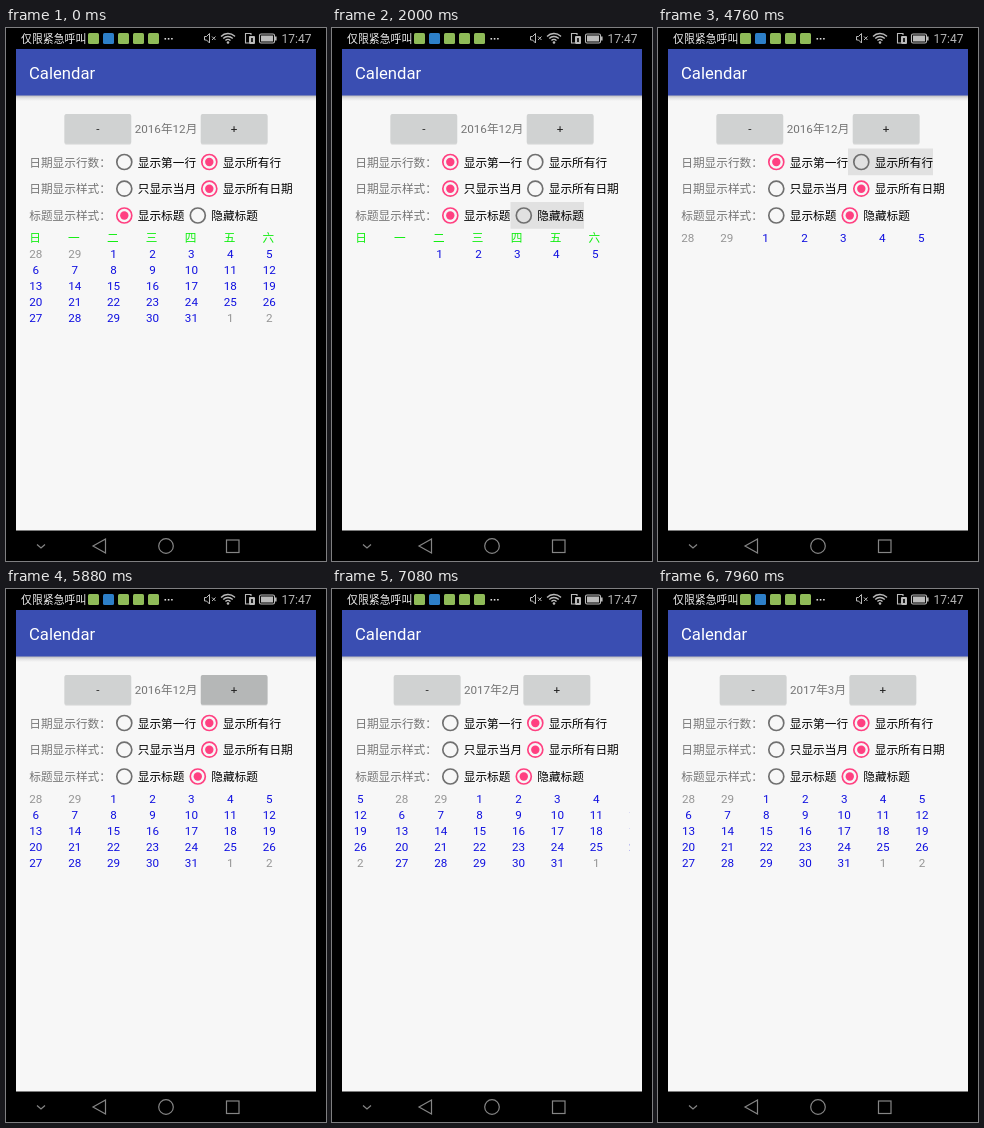
Recreate the animation shown at these times as an HTML page with a canvas. Size 320 px wide and 533 px high, loop 8000 ms.

```html
<!DOCTYPE html>
<html lang="zh-CN">
<head>
<meta charset="utf-8">
<title>Calendar</title>
<style>
html, body { margin: 0; width: 100%; height: 100%; overflow: hidden; background: #000; }
canvas { display: block; width: 320px; height: 533px; }
</style>
</head>
<body>
<canvas id="stage"></canvas>
<script>
const W = 320, H = 533, LOOP = 8000;
const PINK = '#ff4081', GREY = '#757575', BLUE = '#1010e0';
const FONT = 'Roboto, "Noto Sans CJK SC", "Noto Sans CJK", sans-serif';
const canvas = document.getElementById('stage');
const ctx = canvas.getContext('2d');
const scale = window.devicePixelRatio || 1;
canvas.width = W * scale;
canvas.height = H * scale;

// Radio rows: label, centre y, options as [text, left edge, right edge]
const ROWS = [
  { label: '日期显示行数：', y: 134, options: [['显示第一行', 105, 190], ['显示所有行', 190, 275]] },
  { label: '日期显示样式：', y: 160.7, options: [['只显示当月', 105, 190], ['显示所有日期', 190, 287]] },
  { label: '标题显示样式：', y: 187.5, options: [['显示标题', 105, 178.5], ['隐藏标题', 178.5, 252]] }
];

const START = {
  month: '2016年12月', radio: [1, 1, 0], held: null, plusDown: false,
  oneRow: false, monthOnly: false, header: true
};

// Each entry changes part of the state at a time in ms
const EVENTS = [
  [320, { held: [0, 0] }],
  [440, { radio: [0, 1, 0] }],
  [720, { oneRow: true, held: null }],
  [920, { held: [1, 0] }],
  [1200, { radio: [0, 0, 0] }],
  [1400, { monthOnly: true, held: null }],
  [2000, { held: [2, 1] }],
  [2840, { radio: [0, 0, 1] }],
  [3120, { header: false, held: null }],
  [3480, { held: [1, 1] }],
  [4200, { radio: [0, 1, 1], monthOnly: false, held: null }],
  [4760, { held: [0, 1] }],
  [5000, { radio: [1, 1, 1] }],
  [5400, { oneRow: false, held: null }],
  [5880, { plusDown: true }],
  [6520, { plusDown: false, month: '2017年1月' }],
  [7000, { plusDown: true }],
  [7080, { plusDown: false, month: '2017年2月' }],
  [7560, { plusDown: true }],
  [7640, { plusDown: false, month: '2017年3月' }]
];

// Page slides: start, time the held page moves on, offset at that time, decay per tick
const SLIDES = [[6520, 6720, 19, 0.46], [7080, 7320, 28, 0.5], [7640, 7840, 28, 0.3]];
const TICK = 40, PAGE = 275;

function stateAt(t) {
  const state = { ...START };
  for (const [time, change] of EVENTS) if (t >= time) Object.assign(state, change);
  return state;
}

function slideAt(t) {
  const slide = SLIDES.filter(s => t >= s[0]).pop();
  if (!slide) return 0;
  const [, move, first, decay] = slide;
  if (t < move) return 40;
  const offset = first * decay ** Math.floor((t - move) / TICK);
  return offset < 0.6 ? 0 : offset;
}

function box(x, y, w, h, color, r = 0) {
  ctx.fillStyle = color;
  ctx.beginPath();
  ctx.roundRect(x, y, w, h, r);
  ctx.fill();
}

function text(str, x, y, color, { size = 11.67, align = 'left', weight = 400 } = {}) {
  ctx.font = `${weight} ${size}px ${FONT}`;
  ctx.textAlign = align;
  ctx.fillStyle = color;
  ctx.fillText(str, x, y + size * 0.36);
}

function circle(x, y, r) {
  ctx.beginPath();
  ctx.arc(x, y, r, 0, Math.PI * 2);
}

function line(points, closed) {
  ctx.beginPath();
  points.forEach(([x, y]) => ctx.lineTo(x, y));
  if (closed) ctx.closePath();
  ctx.stroke();
}

function drawStatus() {
  text('仅限紧急呼叫', 15, 11, '#eee', { size: 10.9 });
  for (let i = 0; i < 5; i++) {
    box(82 + i * 15, 5, 11, 11, i === 1 ? '#2d7fc8' : '#8fbb58', 1.5);
  }
  for (let i = 0; i < 3; i++) box(158.5 + i * 3.3, 10, 1.6, 1.6, '#ddd');

  ctx.strokeStyle = '#bbb';
  ctx.lineWidth = 1;
  line([[198.5, 8.5], [200.5, 8.5], [203.5, 5.5], [203.5, 15], [200.5, 12], [198.5, 12]], true);
  line([[206, 8.5], [209.5, 12]]);
  line([[209.5, 8.5], [206, 12]]);

  ctx.lineWidth = 1.4;
  for (const r of [3.5, 6.5, 9.5]) {
    ctx.beginPath();
    ctx.arc(222, 15, r, -Math.PI * 0.76, -Math.PI * 0.24);
    ctx.stroke();
  }
  ctx.fillStyle = '#bbb';
  circle(222, 14.5, 1.3);
  ctx.fill();

  ctx.lineWidth = 1.1;
  line([[243, 15], [239.5, 15], [239.5, 5.5], [245, 5.5], [245, 7]]);
  box(243, 8, 6, 8, '#bbb', 1);
  box(245, 10, 2, 4, '#222');

  ctx.beginPath();
  ctx.roundRect(253.5, 6, 15, 9, 1.5);
  ctx.stroke();
  box(255, 7.5, 12, 6, '#bbb');
  box(269, 8.5, 1.6, 4, '#bbb');
  text('17:47', 305.5, 10.8, '#b4b4b4', { size: 12, align: 'right' });
}

function drawNav() {
  ctx.strokeStyle = '#858585';
  ctx.lineWidth = 1.2;
  line([[31, 516.5], [35, 520], [39, 516.5]]);
  line([[87, 518], [99.5, 511], [99.5, 525]], true);
  circle(160, 518, 7.3);
  ctx.stroke();
  ctx.strokeRect(220.5, 512, 12.5, 12.5);
}

function drawFrame() {
  box(0, 0, W, H, '#000');
  box(10, 21, 300, 481.5, '#f7f7f7');
  const shade = ctx.createLinearGradient(0, 67, 0, 73);
  shade.addColorStop(0, '#b4b4b8');
  shade.addColorStop(0.5, '#e2e2e3');
  shade.addColorStop(1, '#f7f7f7');
  box(10, 67, 300, 6, shade);
  box(10, 21, 300, 46.5, '#3a4eb2');
  text('Calendar', 23, 45, '#fff', { size: 16.67 });
  drawStatus();
  drawNav();
}

function drawButton(x, sign, down) {
  box(x, 86.7, 66.7, 30, 'rgba(0,0,0,0.10)', 1.7);
  box(x, 86, 66.7, 29.8, down ? '#b5b7b7' : '#d0d2d2', 1.7);
  text(sign, x + 33.3, 101, '#222', { align: 'center' });
}

function drawMonth({ month, plusDown }) {
  text(month, 160, 101, GREY, { align: 'center' });
  const half = ctx.measureText(month).width / 2 + 3.5;
  drawButton(160 - half - 66.7, '-', false);
  drawButton(160 + half, '+', plusDown);
}

function drawRadio(x, y, on) {
  ctx.strokeStyle = on ? PINK : '#707070';
  ctx.lineWidth = 1.67;
  circle(x, y, 7.5);
  ctx.stroke();
  if (!on) return;
  ctx.fillStyle = PINK;
  circle(x, y, 4.2);
  ctx.fill();
}

function drawOptions({ radio, held }) {
  ROWS.forEach(({ label, y, options }, row) => {
    text(label, 23.3, y + 0.3, GREY);
    options.forEach(([name, left, right], i) => {
      if (held && held[0] === row && held[1] === i) {
        box(left, y - 13.4, right - left, 26.7, '#e1e1e1');
      }
      drawRadio(left + 13.3, y, radio[row] === i);
      text(name, left + 26.8, y + 0.3, '#000');
    });
  });
}

function drawPage(dx, y, { oneRow, monthOnly }) {
  const cells = oneRow ? 7 : 35;
  for (let i = 0; i < cells; i++) {
    const day = i - 1;
    const inside = day >= 1 && day <= 31;
    if (monthOnly && !inside) continue;
    const shown = day < 1 ? day + 29 : inside ? day : day - 31;
    text(shown, 29.8 + dx + (i % 7) * 38.9, y + Math.floor(i / 7) * 16,
      inside ? BLUE : '#959595', { align: 'center' });
  }
}

function drawCalendar(state, offset) {
  let top = 209.6;
  if (state.header) {
    [...'日一二三四五六'].forEach((name, i) => {
      text(name, 29 + i * 38.9, top, '#10ee10', { align: 'center', weight: 500 });
    });
    top += 16.2;
  }
  ctx.save();
  ctx.beginPath();
  ctx.rect(22.5, 200, PAGE, 110);
  ctx.clip();
  drawPage(offset, top, state);
  if (offset) drawPage(offset - PAGE, top, state);
  ctx.restore();
}

function render(now) {
  const t = now % LOOP;
  const state = stateAt(t);
  ctx.setTransform(scale, 0, 0, scale, 0, 0);
  drawFrame();
  drawMonth(state);
  drawOptions(state);
  drawCalendar(state, slideAt(t));
}

const begin = performance.now();
function loop() {
  render(performance.now() - begin);
  requestAnimationFrame(loop);
}
loop();
</script>
</body>
</html>
```
